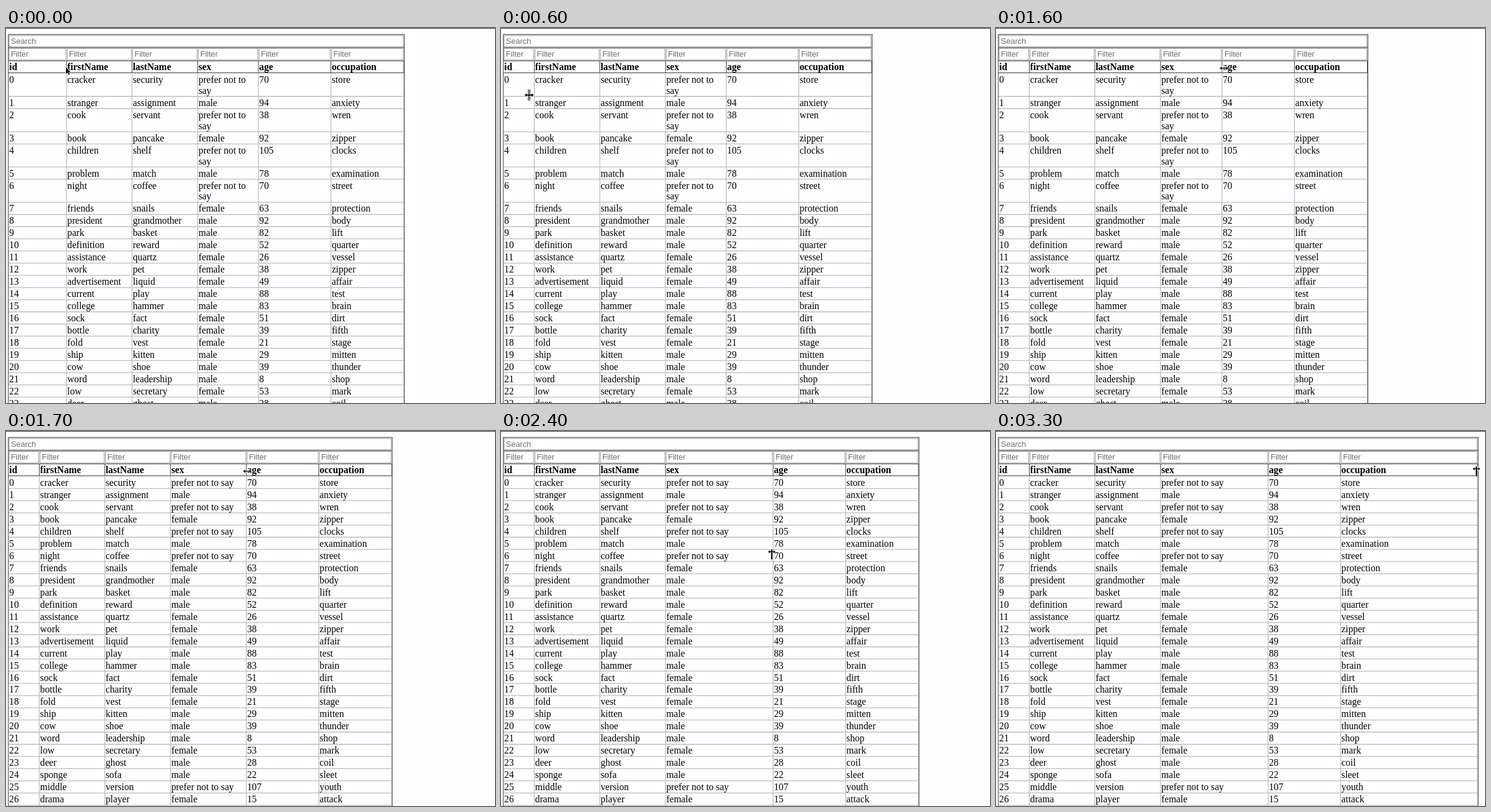
An HTML page that plays this animation: 800x615 px, repeating every 3.4 s.

```html
<!DOCTYPE html>
<html lang="en">
<head>
<meta charset="utf-8">
<title>Resizable table</title>
<style>
html, body { margin: 0; width: 100%; height: 100%; overflow: hidden; background: #fefdff; }
svg { display: block; width: 800px; height: 615px; }
text { font: 15.66px "Liberation Serif", "Times New Roman", serif; fill: #000; }
.head { font-weight: bold; }
.hint { font: 13px "Liberation Sans", Arial, sans-serif; fill: #6e6e6e; }
line, rect { fill: none; stroke-width: 1; }
.light { stroke: #bdbdbd; stroke-width: 1.3; }
.mid { stroke: #999; }
.dark { stroke: #3a3a3a; }
</style>
</head>
<body>
<svg id="stage" viewBox="0 0 800 615"></svg>
<script>
const LOOP = 3400, STEP = 100, LEFT = 4, PITCH = 19.97, EXTRA = 17.9;
const HEADS = ["id", "firstName", "lastName", "sex", "age", "occupation"];
const SEX = { m: "male", f: "female", p: "prefer not to say" };
const ROWS = `cracker security p 70 store
stranger assignment m 94 anxiety
cook servant p 38 wren
book pancake f 92 zipper
children shelf p 105 clocks
problem match m 78 examination
night coffee p 70 street
friends snails f 63 protection
president grandmother m 92 body
park basket m 82 lift
definition reward m 52 quarter
assistance quartz f 26 vessel
work pet f 38 zipper
advertisement liquid f 49 affair
current play m 88 test
college hammer m 83 brain
sock fact f 51 dirt
bottle charity f 39 fifth
fold vest f 21 stage
ship kitten m 29 mitten
cow shoe m 39 thunder
word leadership m 8 shop
low secretary f 53 mark
deer ghost m 28 coil
sponge sofa m 22 sleet
middle version p 107 youth
drama player f 15 attack`.split("\n").map((r, i) => {
  const c = r.split(" ");
  return [i, c[0], c[1], SEX[c[2]], c[3], c[4]];
});

// time, width of id, sex and occupation columns
const SIZES = [
  [0, 95, 99.3, 119.3],
  [300, 84, 99.3, 119.3],
  [400, 61.5, 99.3, 119.3],
  [500, 50.5, 99.3, 119.3],
  [1600, 50.5, 100.5, 119.3],
  [1700, 50.5, 124, 119.3],
  [1800, 50.5, 156, 119.3],
  [1900, 50.5, 174, 119.3],
  [2200, 50.5, 176, 119.3],
  [3100, 50.5, 176, 126],
  [3200, 50.5, 176, 181],
  [3300, 50.5, 176, 224.3]
];

// time, pointer shape, position
const POINTER = [
  [0, "arrow", 98, 64],
  [100, "col", 98.5, 66],
  [300, "col", 88, 64],
  [400, "col", 65.5, 64],
  [500, "col", 50, 64],
  [600, "col", 46, 110],
  [700, "col", 45, 205],
  [800, "col", 45, 286],
  [1000, "beam", 379.5, 65],
  [1100, "beam", 377, 65],
  [1200, "beam", 374, 65],
  [1300, "ew", 372, 66],
  [1400, "ew", 371, 66],
  [1600, "ew", 373, 66],
  [1700, "ew", 395, 66],
  [1800, "ew", 425, 68],
  [1900, "arrow", 440, 73],
  [2000, "arrow", 441, 98],
  [2100, "arrow", 442, 140],
  [2200, "tee", 442, 176],
  [2300, "tee", 443, 190],
  [2400, "tee", 443, 198],
  [2600, "arrow", 530, 150],
  [2700, "arrow", 660, 100],
  [2800, "arrow", 789, 72],
  [2900, "arrow", 735, 66],
  [3000, "tee", 686, 62],
  [3100, "tee", 691, 62],
  [3200, "tee", 745, 61],
  [3300, "tee", 786, 62]
];

const SHAPES = {
  arrow: "M0 0V11.5L2.7 9L4.6 13L6.4 12.2L4.6 8.4H8Z",
  col: "M-1.8 -9H-.6V-1H.6V-9H1.8V-1H4V-3L7.5 0L4 3V1H1.8V9H.6V1H-.6V9H-1.8V1H-4V3L-7.5 0L-4 -3V-1H-1.8Z",
  ew: "M-7 0L-3.5 -3V-.8H3.5V-3L7 0L3.5 3V.8H-3.5V3Z",
  tee: "M-6 0L-3 -2.8V-.8H-1.2V-4H1.2V-.8H3V-2.8L6 0L3 2.8V.8H1.2V12.5H-1.2V.8H-3V2.8Z",
  beam: "M-3 -7.5H-1L0 -6.8L1 -7.5H3V-6.5H1L.5 -6V6L1 6.5H3V7.5H1L0 6.8L-1 7.5H-3V6.5H-1L-.5 6V-6L-1 -6.5H-3Z"
};

const stage = document.getElementById("stage");

function set(el, attrs) {
  for (const k in attrs) el.setAttribute(k, attrs[k]);
}
function add(tag, attrs, label) {
  const el = document.createElementNS("http://www.w3.org/2000/svg", tag);
  set(el, attrs);
  if (label !== undefined) el.textContent = label;
  return stage.appendChild(el);
}
const hline = (cls, y) => add("line", { class: cls, x1: LEFT, y1: y, y2: y });
const vline = (cls, y1, y2) => add("line", { class: cls, y1, y2 });

add("line", { class: "dark", x1: 0, x2: 800, y1: 0.5, y2: 0.5 });
const rules = ROWS.map(() => hline("light", 0));
const sides = HEADS.map(() => vline("light", 75, 615));
const searchBox = add("rect", { class: "mid", x: 5, y: 12.5, height: 18.5 });
const filters = HEADS.map(() => add("rect", { class: "mid", y: 33.5, height: 19 }));
const bars = [10.5, 32, 54, 73.5].map(y => hline("dark", y));
const ticks = HEADS.map(() => vline("dark", 54, 74));
const edge = vline("dark", 10, 615);
add("line", { class: "dark", x1: 3.8, x2: 3.8, y1: 10, y2: 615 });

add("text", { class: "hint", x: 8, y: 26 }, "Search");
const hints = HEADS.map(() => add("text", { class: "hint", y: 47 }, "Filter"));
const heads = HEADS.map(h => add("text", { class: "head", y: 69 }, h));
const cells = ROWS.map(r => r.map(v => add("text", {}, v)));
const says = ROWS.map(r => add("text", {}, r[3] === SEX.p ? "say" : ""));
const pointer = add("path", { stroke: "#fff", "stroke-width": 1.6, "paint-order": "stroke", "stroke-linejoin": "round" });

function layout([, idW, sexW, jobW]) {
  const widths = [idW, 107.2, 107.5, sexW, 118.6, jobW];
  const narrow = sexW < 105;
  let x = LEFT;
  const left = widths.map(w => (x += w) - w);
  const right = x;

  left.forEach((l, c) => {
    const end = l + widths[c], tx = l + 1.3;
    set(filters[c], { x: l + 1, width: widths[c] - 2 });
    set(hints[c], { x: l + 4 });
    set(heads[c], { x: tx });
    for (const line of [sides[c], ticks[c]]) set(line, { x1: end, x2: end });
    cells.forEach(row => set(row[c], { x: tx }));
  });
  set(searchBox, { width: right - 6 });
  set(edge, { x1: right + 0.8, x2: right + 0.8 });
  bars.forEach(b => set(b, { x2: right + 1 }));

  let y = 90;
  ROWS.forEach((r, i) => {
    const wraps = narrow && r[3] === SEX.p;
    cells[i].forEach(t => set(t, { y }));
    if (r[3] === SEX.p) cells[i][3].textContent = wraps ? "prefer not to" : SEX.p;
    set(says[i], { x: left[3] + 1.3, y: y + EXTRA, visibility: wraps ? "visible" : "hidden" });
    y += PITCH + (wraps ? EXTRA : 0);
    set(rules[i], { x2: right, y1: y - 15.6, y2: y - 15.6 });
  });
}

function point([, shape, x, y]) {
  set(pointer, {
    d: SHAPES[shape],
    transform: `translate(${x} ${y})`,
    fill: shape === "beam" ? "#555" : "#111"
  });
}

const at = (table, t) => table.filter(k => k[0] <= t).pop();
let size, spot;

function draw() {
  const t = Math.floor(performance.now() % LOOP / STEP) * STEP;
  const nextSize = at(SIZES, t), nextSpot = at(POINTER, t);
  if (nextSize !== size) layout(size = nextSize);
  if (nextSpot !== spot) point(spot = nextSpot);
  requestAnimationFrame(draw);
}
draw();
</script>
</body>
</html>
```
